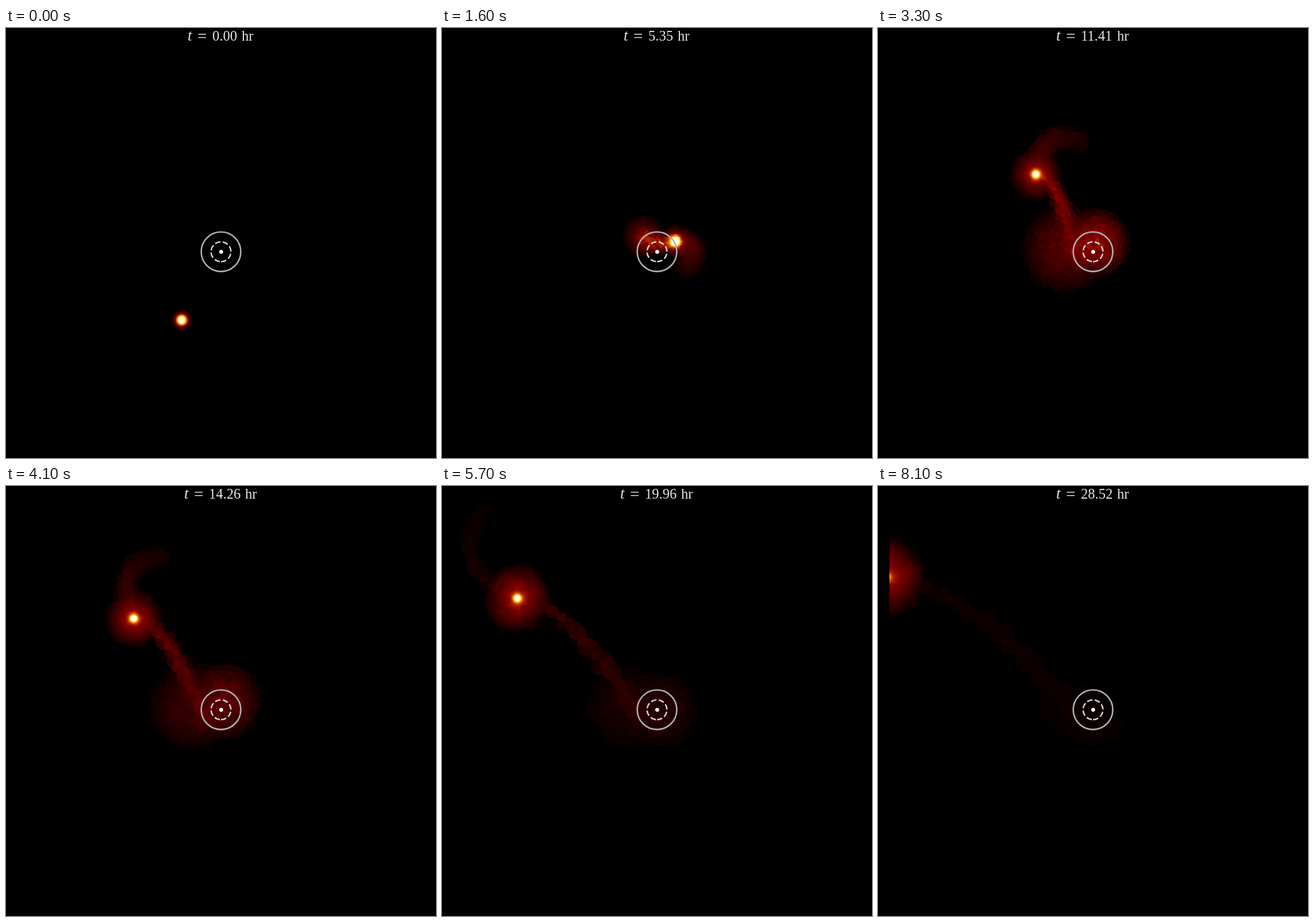
Animation, 748 px wide and 748 px high, one loop 8200 ms. Source, as an HTML page with a canvas:

```html
<!DOCTYPE html>
<html lang="en">
<head>
<meta charset="utf-8">
<title>Tidal disruption</title>
<style>
html, body { margin: 0; width: 100%; height: 100%; overflow: hidden; background: #000; }
canvas, svg { position: absolute; left: 0; top: 0; width: 748px; height: 748px; }
text { font: 24.5px "Liberation Serif", serif; fill: #e6e6e6; }
#sym { font-size: 27px; font-style: italic; }
#eq { font-size: 29px; }
</style>
</head>
<body>
<canvas width="748" height="748"></canvas>
<svg viewBox="0 0 748 748" fill="none" stroke-width="2.6">
  <circle cx="374" cy="389.2" r="34.4" stroke="#b0b0b0"/>
  <path d="M374 406.5a17.3 17.3 0 0 0 0 -34.6a17.3 17.3 0 0 0 0 34.6" stroke="#d0d0d0" stroke-dasharray="9.6 4.15"/>
  <circle cx="374.3" cy="389.3" r="3.4" fill="#fff"/>
  <text><tspan id="sym" y="22">t</tspan><tspan id="eq" y="24">=</tspan><tspan id="num" y="22"></tspan><tspan id="unit" y="22">hr</tspan></text>
</svg>
<script>
const LOOP = 8200, STEP = 100, HOURS = 0.3565;
const HOLE = { x: 374, y: 389 };
const AREA = { x: 20, y: 25, w: 450, h: 508 };
const ctx = document.querySelector('canvas').getContext('2d');
const image = ctx.createImageData(AREA.w, AREA.h);
const label = id => document.getElementById(id);

const clamp = u => Math.max(0, Math.min(1, u));
const ramp = (i, from, to) => clamp((i - from) / (to - from));
const decay = (i, from, span) => Math.min(1, Math.exp((from - i) / span));
const polar = (p, radius, degrees) => ({
  x: p.x + radius * Math.cos(degrees * Math.PI / 180),
  y: p.y - radius * Math.sin(degrees * Math.PI / 180)
});

// Near-parabolic orbit around the hole, solved with Barker's equation.
function star(i) {
  const m = 1.5 * (-3.476 + 0.2507 * i - 7.7e-5 * i * i);
  const c = Math.cbrt(m + Math.sqrt(m * m + 1));
  const y = 68.6 * (c - 1 / c);
  return { x: HOLE.x + 34.3 - y * y / (y < 0 ? 138 : 135.3), y: HOLE.y - y };
}

function bezier(pts, t) {
  while (pts.length > 1) {
    pts = pts.slice(1).map((p, k) => ({
      x: pts[k].x + (p.x - pts[k].x) * t,
      y: pts[k].y + (p.y - pts[k].y) * t
    }));
  }
  return pts[0];
}

// A soft curve whose width and strength vary along it.
const strand = (pts, width, strength) => Array.from({ length: 8 }, (_, k) => {
  const t = k / 7;
  return { ...bezier(pts, t), w: width(t), v: strength(t) };
});

// Gas trailing on the far side of the star, unwinding as it recedes.
function outerTail(i, s) {
  const angle = -58 + 128 * Math.log(Math.max(i, 1) / 15);
  const v = Math.max(0, 0.28 - 0.004 * i) * ramp(i, 8, 14);
  const pts = [s, polar(s, 2.6 * i, angle + 45), polar(s, 2.9 * i, angle)];
  return strand(pts, () => 34 - 0.28 * i, t => v * (1 - 0.6 * t));
}

// S-shaped stream that falls from the star back to the hole.
function innerStream(i, s) {
  const r = Math.hypot(s.x - HOLE.x, s.y - HOLE.y);
  const v = Math.max(0, 0.37 * decay(i, 22, 30) - 0.02) * ramp(i, 9, 15);
  const pts = [
    s,
    { x: s.x + 0.25 * r, y: s.y },
    { x: HOLE.x - 0.28 * r, y: HOLE.y - 0.24 * r },
    polar(HOLE, 31, 120 + 90 * ramp(i, 14, 22))
  ];
  return strand(pts, t => 13 + 12 * t, t => v * (1 - 0.2 * t));
}

// Gas gathered beside the hole and in a disk around it.
function clouds(i) {
  const w = 80 * Math.sqrt(ramp(i, 10, 32));
  return [
    { x: HOLE.x - 0.6 * w, y: HOLE.y - 30 + 25 * ramp(i, 12, 32), w: w + 1,
      v: 0.24 * decay(i, 22, 22) * ramp(i, 11, 17) },
    { x: HOLE.x + 4, y: HOLE.y - 15 + 35 * ramp(i, 40, 75), w: 1 + 70 * ramp(i, 16, 34),
      v: 0.26 * decay(i, 32, 19) * ramp(i, 18, 30) }
  ];
}

const bump = (d2, w, v) => Math.max(0, v * (1 - d2 / (w * w)));
const blob = (p, x, y) => bump((x - p.x) ** 2 + (y - p.y) ** 2, p.w, p.v);

function along(pts, x, y) {
  let best = 0;
  for (let k = 1; k < pts.length; k++) {
    const a = pts[k - 1], b = pts[k], dx = b.x - a.x, dy = b.y - a.y;
    const u = clamp(((x - a.x) * dx + (y - a.y) * dy) / (dx * dx + dy * dy + 1e-6));
    const d2 = (x - a.x - u * dx) ** 2 + (y - a.y - u * dy) ** 2;
    best = Math.max(best, bump(d2, a.w + (b.w - a.w) * u, a.v + (b.v - a.v) * u));
  }
  return best;
}

// Seeded jitter for the mesh cells.
const N = 256;
let seed = 7;
const noise = () => Float32Array.from({ length: N * N }, () => {
  seed = (Math.imul(seed, 1664525) + 1013904223) >>> 0;
  return seed / 4294967296;
});
const jitterX = noise(), jitterY = noise(), shade = noise();

function drawGas(i) {
  const s = star(i), spread = ramp(i, 12, 30);
  const radius = Math.max(21, 8.3 * Math.sqrt(i));
  const glow = 0.1 + 0.25 * spread;
  const core = 9 - 2.4 * spread, peak = 1 - 0.2 * spread;
  const tail = outerTail(i, s), stream = innerStream(i, s), lobes = clouds(i);

  // Flat-shaded cells grow as the gas thins out.
  const size = Math.max(3, 2 + 0.18 * i);
  const left = AREA.x - 2 * size, top = AREA.y - 2 * size;
  const cols = Math.ceil(AREA.w / size) + 4, rows = Math.ceil(AREA.h / size) + 4;
  const cx = new Float32Array(cols * rows), cy = cx.slice(), cv = cx.slice(), cr = cx.slice();
  for (let r = 0; r < rows; r++) for (let c = 0; c < cols; c++) {
    const k = r * cols + c, n = (r * N + c) % (N * N);
    const x = cx[k] = left + (c + jitterX[n]) * size;
    const y = cy[k] = top + (r + jitterY[n]) * size;
    cr[k] = shade[n];
    let sum = along(tail, x, y) ** 4 + along(stream, x, y) ** 4;
    for (const p of lobes) sum += blob(p, x, y) ** 4;
    const v = Math.sqrt(Math.sqrt(sum)) * (0.84 + 0.32 * shade[n]);
    cv[k] = v < 0.012 ? 0 : v;
  }

  let o = 0;
  for (let py = 0; py < AREA.h; py++) for (let px = 0; px < AREA.w; px++) {
    const x = px + AREA.x + 0.5, y = py + AREA.y + 0.5;
    const c = Math.floor((x - left) / size), r = Math.floor((y - top) / size);
    let best = 1e9, cell = 0;
    for (let v = r - 1; v <= r + 1; v++) for (let u = c - 1; u <= c + 1; u++) {
      const k = v * cols + u, d = (x - cx[k]) ** 2 + (y - cy[k]) ** 2;
      if (d < best) { best = d; cell = k; }
    }
    const d = Math.hypot(x - s.x, y - s.y);
    const halo = Math.max(0, glow * (1 - (d + (cr[cell] - 0.5) * size * 0.6) / radius));
    const gas = Math.sqrt(Math.sqrt(cv[cell] ** 4 + halo ** 4));
    const heat = 510 * (gas + peak * Math.exp(-d * d / (core * core)));
    image.data[o++] = heat;
    image.data[o++] = heat - 127;
    image.data[o++] = heat - 255;
    image.data[o++] = 255;
  }
  ctx.putImageData(image, AREA.x, AREA.y);
}

function drawTime(i) {
  const value = (i * HOURS + 1e-9).toFixed(2);
  const wide = value.length > 4, x = wide ? 310 : 316;
  label('sym').setAttribute('x', x);
  label('eq').setAttribute('x', x + 17);
  label('num').setAttribute('x', x + 43);
  label('unit').setAttribute('x', x + (wide ? 106 : 94));
  label('num').textContent = value;
}

let shown = -1;
function tick() {
  const i = Math.max(0, Math.floor(performance.now() % LOOP / STEP) - 1);
  if (i !== shown) {
    shown = i;
    drawGas(i);
    drawTime(i);
  }
  requestAnimationFrame(tick);
}
tick();
</script>
</body>
</html>
```
